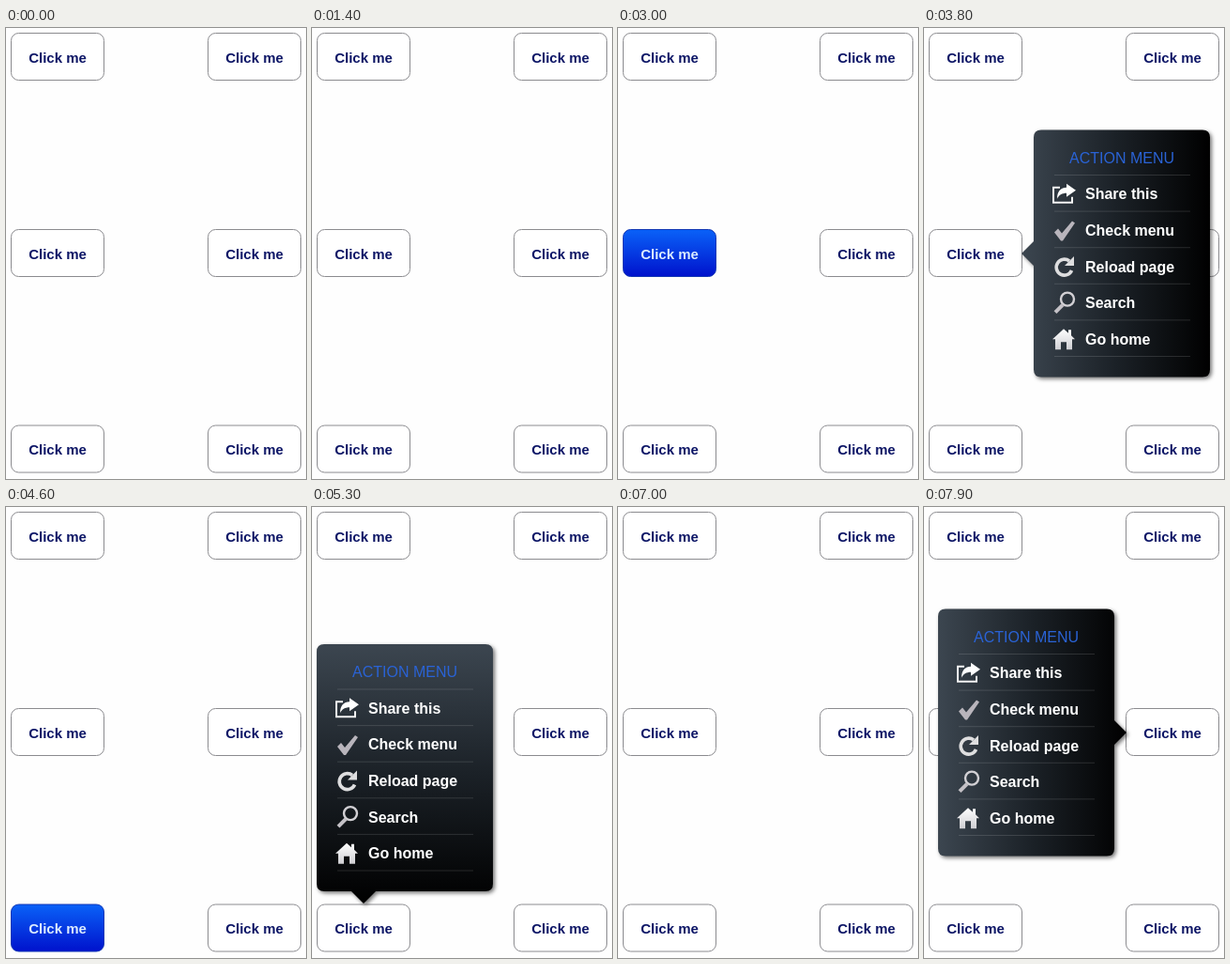
Animation, 320 px wide and 480 px high, one loop 8 s. Source, as an HTML page:

```html
<!DOCTYPE html>
<html lang="en">
<head>
<meta charset="utf-8">
<title>Action menu</title>
<style>
  html, body { margin: 0; width: 100%; height: 100%; overflow: hidden; background: #fefefe; }
  svg { display: block; width: 100%; height: 100%; font-family: "Liberation Sans", Arial, sans-serif; }
  .button rect { fill: #fff; stroke: #8b8b8f; }
  .button text { font: bold 15px "Liberation Sans", Arial, sans-serif; fill: #0c1566; text-anchor: middle; }
  .button.down rect { fill: url(#pressed); stroke: #1237b4; }
  .button.down text { fill: #dcecff; }
  .panel { filter: drop-shadow(2px 2px 2px rgba(0, 0, 0, .55)); }
  .title { font-size: 16px; fill: #2a63d6; text-anchor: middle; }
  .item { font-size: 16px; font-weight: bold; fill: #fff; }
  .rule { stroke: #fff; stroke-opacity: .13; }
</style>
</head>
<body>
<svg id="stage" viewBox="0 0 320 480">
  <defs>
    <linearGradient id="pressed" x2="0" y2="1">
      <stop stop-color="#0a62f8"/>
      <stop offset="1" stop-color="#0012cc"/>
    </linearGradient>
    <linearGradient id="down" x2="0" y2="1">
      <stop stop-color="#3c4650"/>
      <stop offset=".5" stop-color="#1b2127"/>
      <stop offset="1" stop-color="#000"/>
    </linearGradient>
    <linearGradient id="across" href="#down" x2="1" y2="0"/>
    <linearGradient id="metal" x2="0" y2="1">
      <stop stop-color="#fff"/>
      <stop offset="1" stop-color="#cfcfd3"/>
    </linearGradient>
  </defs>
</svg>
<script>
const LOOP = 8000, STEP = 100;
const stage = document.getElementById('stage');

function add(parent, tag, attrs, text) {
  const el = document.createElementNS('http://www.w3.org/2000/svg', tag);
  for (const key in attrs) el.setAttribute(key, attrs[key]);
  if (text) el.textContent = text;
  parent.appendChild(el);
  return el;
}

// Icons are drawn around the centre of their row.
const stroke = (d, width, color = '#f4f4f4') =>
  ({ d, fill: 'none', stroke: color, 'stroke-width': width });
const fill = (d, color = 'url(#metal)') => ({ d, fill: color });
const items = [
  ['Share this', [
    stroke('M-4 -7H-11V9H9V3', 2),
    fill('M3 -11L13 -4L3 3V-1C-2 -1 -5 1 -7 5C-7 -3 -3 -7 3 -7Z', '#fff')]],
  ['Check menu', [fill('M-10 2L-6 -2L-2 3L9 -10L12 -8L-1 11H-3Z', '#b9b5bc')]],
  ['Reload page', [
    stroke('M6 -6A8.5 8.5 0 1 0 8.5 4', 3.6, '#dededf'),
    fill('M11 -11V-1H1Z', '#dededf')]],
  ['Search', [
    stroke('M-3 -4A7 7 0 1 1 11 -4A7 7 0 1 1 -3 -4Z', 2.4, '#d2d0d4'),
    stroke('M-1 2L-9 10', 4, '#c4c1c6')]],
  ['Go home', [fill('M0 -11L5 -6.5V-10H8V-4L12 0H9V11H3V3H-3V11H-9V0H-12Z')]]
];

function makeButton(x, y) {
  const g = add(stage, 'g', { class: 'button' });
  add(g, 'rect', { x: x + .5, y: y + .5, width: 99, height: 50, rx: 8 });
  add(g, 'text', { x: x + 50, y: y + 31.5 }, 'Click me');
  return g;
}

// (tx, ty) is the middle of the pointer's base, (dx, dy) its direction.
function makeMenu({ x, y, tx, ty, dx, dy }) {
  const g = add(stage, 'g', { transform: `translate(${x} ${y})` });
  const bx = tx - dx, by = ty - dy, half = 14;
  const tip = `M${bx + half * dy} ${by - half * dx}` +
    `L${tx + 13 * dx} ${ty + 13 * dy}L${bx - half * dy} ${by + half * dx}Z`;
  const box = 'M8 0H180Q188 0 188 8V255Q188 263 180 263H8Q0 263 0 255V8Q0 0 8 0Z';
  add(g, 'path', { class: 'panel', d: box + tip, fill: `url(#${dx ? 'across' : 'down'})` });
  add(g, 'text', { class: 'title', x: 94, y: 35 }, 'ACTION MENU');
  const rule = n => add(g, 'path', { class: 'rule', d: `M22 ${48 + n * 38.6}H167` });
  rule(0);
  items.forEach(([label, shapes], n) => {
    const mid = 68.3 + n * 38.6;
    const icon = add(g, 'g', { transform: `translate(32 ${mid})` });
    shapes.forEach(shape => add(icon, 'path', shape));
    add(g, 'text', { class: 'item', x: 55, y: mid + 5.5 }, label);
    rule(n + 1);
  });
  return g;
}

const rows = [5, 214, 422.5];
const buttons = [];
for (const x of [5, 215]) for (const y of rows) buttons.push(makeButton(x, y));

// press and release of the button, then opening and closing of its menu
const taps = [
  { press: 1600, release: 1800, open: 2000, close: 2600,
    x: 5, y: 70, tx: 50, ty: 0, dx: 0, dy: -1 },
  { press: 3000, release: 3300, open: 3500, close: 4100,
    x: 117, y: 108.5, tx: 0, ty: 131.5, dx: -1, dy: 0 },
  { press: 4500, release: 4800, open: 4900, close: 5400,
    x: 5, y: 146, tx: 50, ty: 263, dx: 0, dy: 1 },
  { press: 5900, release: 6200, open: 6300, close: 6800,
    x: 127, y: 70, tx: 138, ty: 0, dx: 0, dy: -1 },
  { press: 7300, release: 7500, open: 7600, close: LOOP,
    x: 15, y: 108.5, tx: 188, ty: 131.5, dx: 1, dy: 0 }
];
const menus = taps.map(makeMenu);
const clamp = v => Math.min(1, Math.max(0, v));

function draw(t) {
  taps.forEach(({ press, release, open, close }, i) => {
    buttons[i].classList.toggle('down', t >= press && t < release);
    const shown = clamp((t - open + STEP) / 200) * clamp(1 - (t - close + STEP) / 300);
    menus[i].setAttribute('opacity', shown);
    menus[i].setAttribute('visibility', shown > 0 ? 'visible' : 'hidden');
  });
}

const start = performance.now();
function tick() {
  const t = (performance.now() - start) % LOOP;
  draw(Math.floor(t / STEP) * STEP);
  requestAnimationFrame(tick);
}
tick();
</script>
</body>
</html>
```
